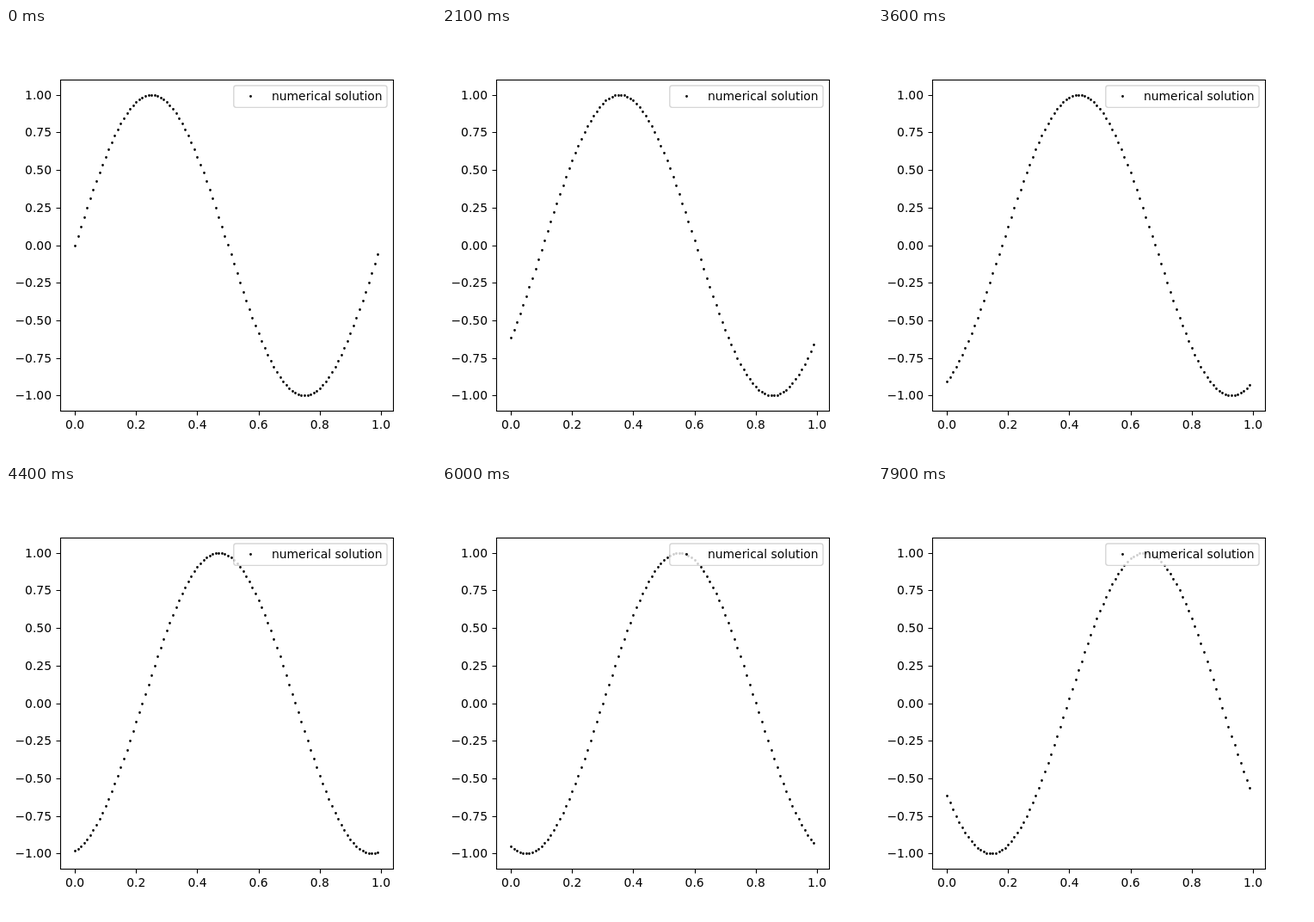
Animation, 500 px wide and 500 px high, one loop 8 s. Source, as an HTML page:

```html
<!DOCTYPE html>
<html lang="en">
<head>
<meta charset="utf-8">
<title>Travelling sine wave</title>
<style>
  html, body { margin: 0; width: 100%; height: 100%; overflow: hidden; background: #fff; }
  svg { display: block; width: 100vw; height: 100vh; }
  text { font: 13.889px "DejaVu Sans", sans-serif; fill: #000; }
  .line { fill: none; stroke: #000; stroke-width: 1.11; }
  .dots { fill: none; stroke: #000; stroke-width: 2.78; stroke-linecap: round; }
</style>
</head>
<body>
<svg viewBox="0 0 500 500">
  <path id="wave" class="dots"/>
  <path id="ticks" class="line"/>
  <rect class="line" x="63.5" y="60.5" width="387" height="385"/>
  <g id="labels"></g>
  <rect x="264.8" y="66.95" width="178.26" height="25.4" rx="2.8"
        fill="#fff" fill-opacity=".8" stroke="#ccc" stroke-opacity=".8" stroke-width="1.39"/>
  <path class="dots" d="M284.5 79.5h0"/>
  <text x="309" y="84">numerical solution</text>
</svg>
<script>
const STEP_MS = 100, STEPS = 80, SHIFT = 0.005, POINTS = 100;
const byId = id => document.getElementById(id);

// Data coordinates to pixel centres
const snap = v => Math.floor(v + 0.5) + 0.5;
const rawX = x => 80.114 + 355.831 * x;
const px = x => snap(rawX(x));
const py = y => snap(252.5 - 174.99 * y);

function addLabel(value, digits, x, y, anchor) {
  const label = document.createElementNS("http://www.w3.org/2000/svg", "text");
  label.setAttribute("x", x);
  label.setAttribute("y", y);
  label.setAttribute("text-anchor", anchor);
  label.textContent = (value < 0 ? "\u2212" : "") + Math.abs(value).toFixed(digits);
  byId("labels").append(label);
}

function drawAxes() {
  let d = "";
  for (let i = 0; i <= 5; i++) {
    const x = i / 5;
    d += `M${px(x)} 445.5v5`;
    addLabel(x, 1, rawX(x), 466, "middle");
  }
  for (let i = -4; i <= 4; i++) {
    const y = i / 4;
    d += `M63.5 ${py(y)}h-5`;
    addLabel(y, 2, 53, Math.floor(py(y)) + 5, "end");
  }
  byId("ticks").setAttribute("d", d);
}

function drawWave(step) {
  let d = "";
  for (let i = 0; i < POINTS; i++) {
    const x = i / POINTS;
    d += `M${px(x)} ${py(Math.sin(2 * Math.PI * (x - step * SHIFT)))}h0`;
  }
  byId("wave").setAttribute("d", d);
}

let start, shown = 0;
function frame(now) {
  start ??= now;
  const step = Math.floor((now - start) / STEP_MS) % STEPS;
  if (step !== shown) drawWave(shown = step);
  requestAnimationFrame(frame);
}

drawAxes();
drawWave(0);
requestAnimationFrame(frame);
</script>
</body>
</html>
```
